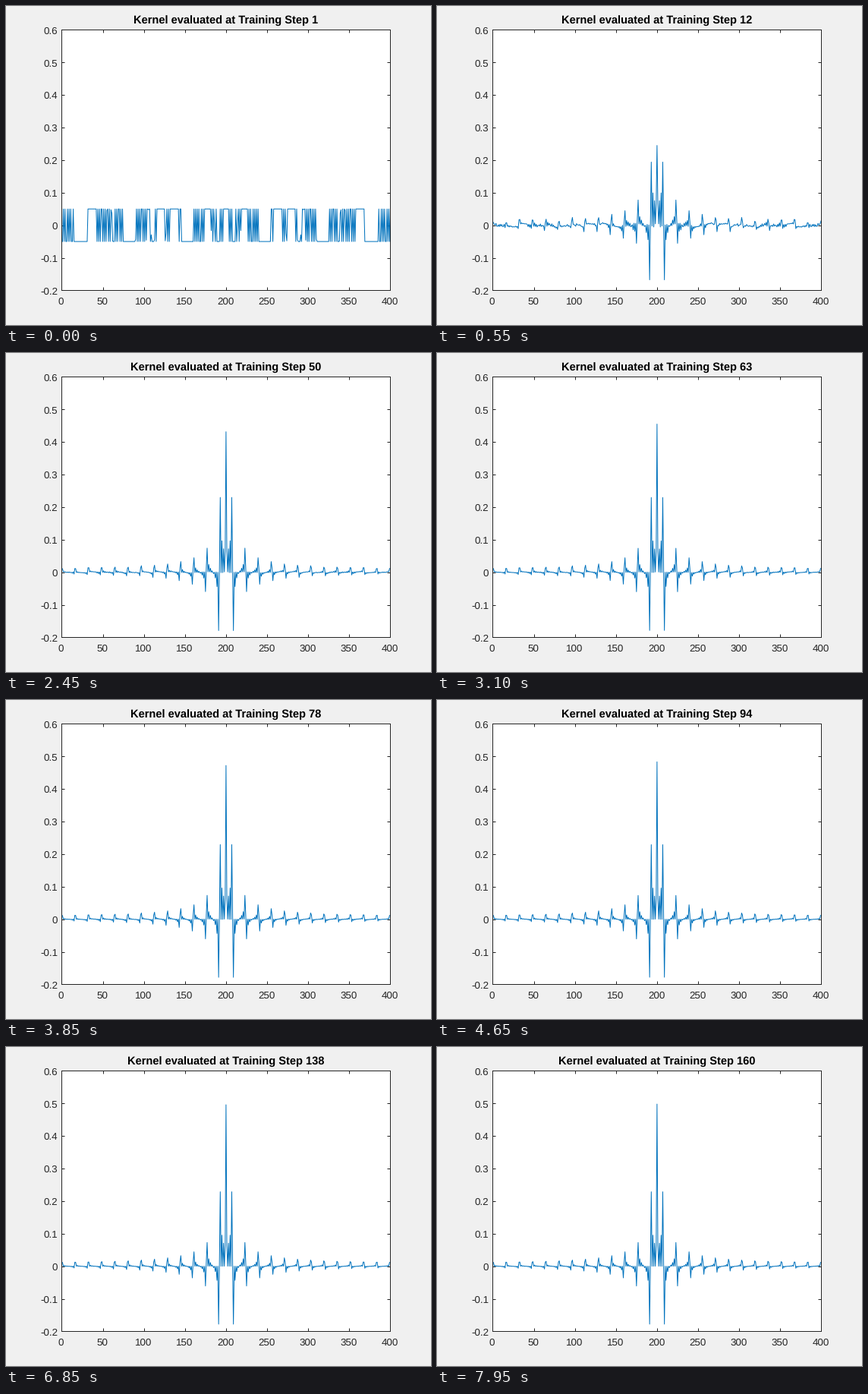
A matplotlib script for the animation above (8 s loop, 560 by 420 pixels).

```python
import numpy as np
import matplotlib.pyplot as plt
from matplotlib.animation import FuncAnimation

W, H = 560, 420
STEPS = 160
RATE = 0.05
CENTRE = 199
INK = "#262626"
PT = 0.72  # points per pixel at 100 dpi

plt.rcParams["path.simplify"] = False
plt.rcParams["font.family"] = "Liberation Sans"
plt.rcParams["text.hinting"] = "none"


def ideal_kernel(n):
    """Comb of eight alternating pass and stop bands, sampled in time."""
    odd = n % 2 == 1
    safe = np.where(odd, n, 1)
    h = np.where(odd, np.tan(np.pi * safe / 16) / (np.pi * safe), 0.0)
    h[n == 0] = 0.5
    phase = np.abs(n) % 16
    h[phase == 8] += 0.0125
    h[((phase == 7) | (phase == 9)) & (np.abs(n) > 16)] += 0.0033
    return h


def bumps(dist, centres, width):
    return sum(np.exp(-((dist - c) / width) ** 4) for c in centres)


def first_pull(dist, h, rng):
    """Rapid spikes broken by calm low and high stretches."""
    spikes = np.cos(2 * np.pi * dist / 2.33) - 0.1
    noise = 0.6 * rng.standard_normal(201)[dist]
    high = bumps(dist, (23, 63.5, 79.5, 163), 4)
    low = bumps(dist, (46.5, 118.5, 175.5), 6.5)
    return spikes + noise + 5 * (high - low) + 30 * h


def train():
    """Adagrad on the taps, each weakly coupled to the slow centre tap."""
    rng = np.random.default_rng(4)
    n = np.arange(1, 401) - 200
    dist = np.abs(n)
    h = ideal_kernel(n)
    pull = first_pull(dist, h, rng)
    mix = 0.016 * np.clip(pull, -1, 1)
    mix[CENTRE] = 0

    w = RATE * np.tanh(20 * pull)
    total = (h + 0.5 * mix) ** 2
    history = [w]
    for step in range(2, STEPS + 1):
        err = w - h
        jitter = 0.02 * np.exp(-step / 4) * rng.standard_normal(201)[dist]
        jitter[CENTRE] = 0
        grad = err + mix * err[CENTRE] + jitter
        total = total + grad ** 2
        w = w - RATE * grad / np.sqrt(total)
        history.append(w)
    return history


kernels = train()

fig = plt.figure(figsize=(5.6, 4.2), dpi=100, facecolor="#F0F0F0")
left, right, top, bottom = 73.4, 506.4, 31.4, 374.4
ax = fig.add_axes([left / W, 1 - bottom / H,
                   (right - left) / W, (bottom - top) / H])
ax.set(xlim=(0, 400), ylim=(-0.2, 0.6), facecolor="white",
       xticks=np.arange(0, 401, 50), yticks=np.arange(-2, 7) / 10)
ax.tick_params(direction="in", top=True, right=True, length=4.3 * PT,
               width=PT, color=INK, labelbottom=False, labelleft=False)
for spine in ax.spines.values():
    spine.set(linewidth=PT, color=INK)


def label(x, y, text, size, **style):
    return fig.text(x / W, 1 - y / H, text, fontsize=size * PT,
                    va="baseline", **style)


for v in range(0, 401, 50):
    label(left - 0.9 + v / 400 * (right - left), 393, str(v), 13.33,
          ha="center", color=INK)
for k in range(-2, 7):
    y = bottom - (k + 2) / 8 * (bottom - top)
    label(68, y + 5.2, f"{k / 10:g}", 13.33, ha="right", color=INK)

title = label(290, 24, "", 14.67, ha="center", color="black", weight="bold")
curve, = ax.plot(np.arange(1, 401), kernels[0], color="#0072BD",
                 lw=PT, solid_joinstyle="round")


def update(i):
    curve.set_ydata(kernels[i])
    title.set_text(f"Kernel evaluated at Training Step {i + 1}")
    return curve, title


anim = FuncAnimation(fig, update, frames=STEPS, interval=50,
                     repeat=True, repeat_delay=0)
plt.show()
```
